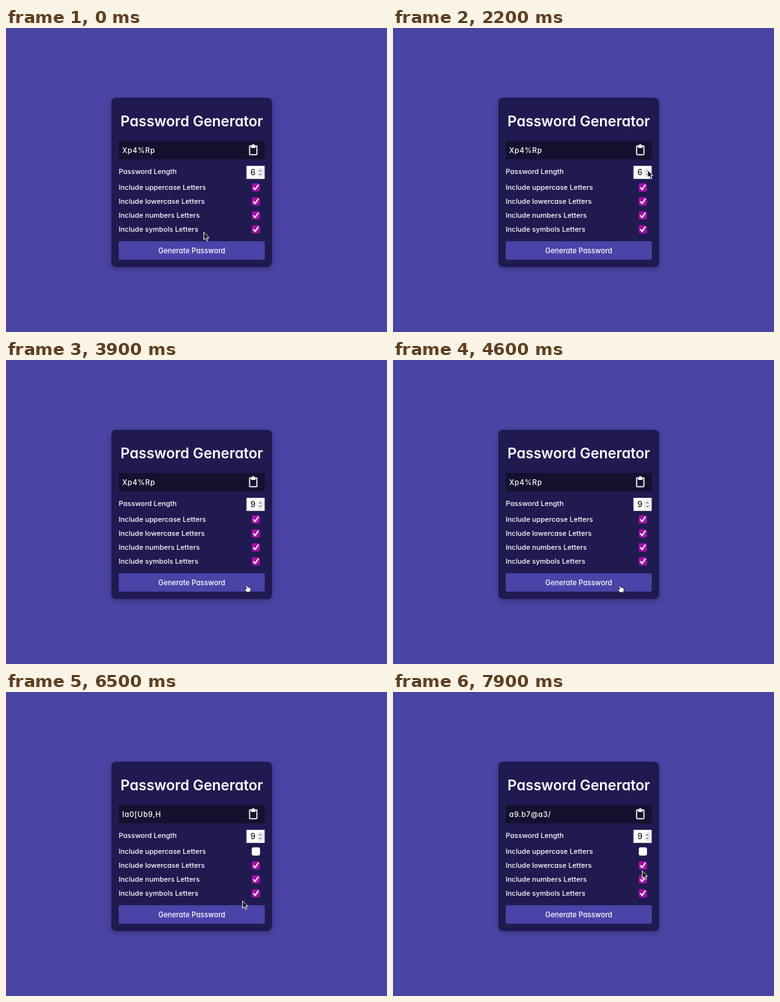
An HTML page that plays this animation: 600x479 px, repeating every 8000 ms.

```html
<!DOCTYPE html>
<html lang="en">
<head>
<meta charset="utf-8">
<title>Password Generator</title>
<style>
  html, body { margin: 0; width: 100%; height: 100%; overflow: hidden; background: #4a45a5; }
  svg { display: block; width: 600px; height: 479px; }
  .card { filter: drop-shadow(0 2px 4px rgba(0, 0, 0, .3)); }
  text {
    font: 500 11px Inter, Lato, sans-serif;
    font-feature-settings: "cv11";
    fill: #fff;
  }
  .title { font-size: 22.6px; font-weight: 560; }
  .mid { text-anchor: middle; }
  .button { font-size: 11.2px; }
  #password { font-size: 11.4px; letter-spacing: .6px; }
  #length { font-size: 12.4px; fill: #111; }
</style>
</head>
<body>
<svg viewBox="0 0 600 479">
  <defs>
    <rect id="blank" x="-6.5" y="-6.5" width="13" height="13" rx="3"/>
    <g id="tick">
      <use href="#blank" fill="#a112a8"/>
      <path d="M-3.6 .4L-1.2 3.3L3.6-3.8" fill="none" stroke="#fff" stroke-width="1.9" stroke-linecap="round" stroke-linejoin="round"/>
    </g>
  </defs>

  <rect class="card" x="166" y="110" width="253" height="266.5" rx="7" fill="#201a51"/>
  <text class="title mid" x="292.5" y="155">Password Generator</text>

  <rect x="177.5" y="178" width="230" height="29" fill="#14112f"/>
  <text id="password" x="183" y="197"></text>
  <g fill="none" stroke="#fff" stroke-width="1.7">
    <rect x="383.6" y="185.6" width="11.6" height="14" rx="1"/>
    <path d="M386.3 186.5h6.2v2h-6.2z" fill="#fff" stroke-width="1"/>
    <circle cx="389.4" cy="184.7" r="1.3" stroke-width="1.2"/>
  </g>

  <text x="177.5" y="230">Password Length</text>
  <rect x="379" y="217.5" width="28" height="20" fill="#fff" stroke="#c5c5cd"/>
  <text id="length" x="385" y="232.4"></text>
  <rect x="396.8" y="221.5" width="7.4" height="12.5" rx="2.5" fill="#f4f4f6" stroke="#c4c4c8" stroke-width=".6"/>
  <path d="M398.8 226l1.7-2 1.7 2M398.8 229.5l1.7 2 1.7-2" fill="none" stroke="#222"/>

  <g id="options" fill="#fff"></g>

  <rect x="177.5" y="336" width="230" height="29" rx="2" fill="#4a43a8"/>
  <text class="button mid" x="292.5" y="354.6">Generate Password</text>

  <g id="pointer">
    <path id="arrow" d="M0 0V11.6L2.7 9.1L4.6 13.4L6.7 12.5L4.9 8.3H8.4Z" fill="#111" stroke="#fff" stroke-linejoin="round"/>
    <path id="hand" d="M-1 .8Q0-.7 1.1 .8L2 3.7Q3.2 2.9 3.8 3.9Q5 3.3 5.4 4.4Q6.8 4.1 6.8 5.6V8L5.8 11.2H.2L-2.9 7.2Q-3.3 5.6-1.7 6L-.2 7Z" fill="#fff" stroke="#111" stroke-width=".9" stroke-linejoin="round"/>
  </g>
</svg>
<script>
  const LOOP = 8000, STEP = 100, MS_PER_PX = 4;
  const byId = id => document.getElementById(id);
  const clamp = (v, lo, hi) => Math.min(hi, Math.max(lo, v));

  ["uppercase", "lowercase", "numbers", "symbols"].forEach((kind, i) => {
    const y = 251.3 + i * 22;
    byId("options").innerHTML +=
      `<text x="177.5" y="${y + 4}">Include ${kind} Letters</text>` +
      `<use href="#tick" x="393.5" y="${y}"/>`;
  });
  const upper = document.querySelector("#options use");

  // Places the pointer visits and when it gets there
  const stops = [
    { x: 311.5, y: 322, time: 0 },
    { x: 404, y: 173, time: 1080 },
    { x: 401, y: 224, time: 2100 },
    { x: 376, y: 370, time: 4020 },
    { x: 357, y: 355, time: 4500 },
    { x: 382, y: 259, time: 5300 },
    { x: 395, y: 250, time: 5700 },
    { x: 366, y: 352, time: 6630 },
    { x: 392.5, y: 282, time: 7700 }
  ];
  const passwords = ["Xp4%Rp", "Ia0[Ub9,H", "a9.b7@a3/"];
  const clicks = [4800, 6900];

  // Each eased move lasts in proportion to its distance
  function position(t) {
    let { x, y } = stops[0];
    for (const stop of stops.slice(1)) {
      const dx = stop.x - x, dy = stop.y - y;
      const k = clamp(1 + (t - stop.time) / (MS_PER_PX * Math.hypot(dx, dy)), 0, 1);
      const ease = k * k * (3 - 2 * k);
      x += dx * ease;
      y += dy * ease;
      if (k < 1) break;
    }
    return [x, y];
  }

  function draw(now) {
    const t = Math.floor(now % LOOP / STEP) * STEP;
    const [x, y] = position(t);
    const onButton = y >= 336 && y <= 365;
    byId("pointer").setAttribute("transform", `translate(${x} ${y})`);
    byId("arrow").style.display = onButton ? "none" : "";
    byId("hand").style.display = onButton ? "" : "none";
    byId("password").textContent = passwords[clicks.filter(c => c <= t).length];
    byId("length").textContent = 6 + clamp(Math.floor((t - 2100) / 300), 0, 3);
    upper.setAttribute("href", t < 5900 ? "#tick" : "#blank");
    requestAnimationFrame(draw);
  }
  draw(performance.now());
</script>
</body>
</html>
```
